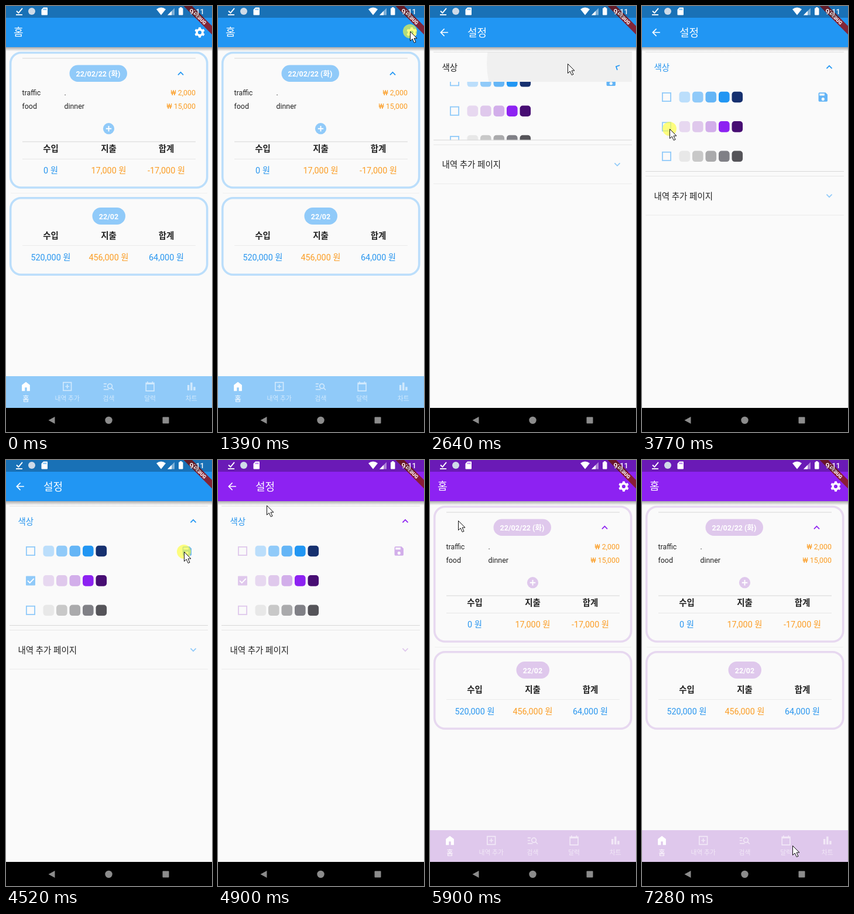
Animation, 352 px wide and 725 px high, one loop 7530 ms. Source, as an HTML page:

```html
<!DOCTYPE html>
<html lang="ko">
<head>
<meta charset="utf-8">
<title>가계부</title>
<style>
  html, body { margin: 0; width: 100%; height: 100%; overflow: hidden; background: #fafafa; }
  svg { display: block; width: 352px; height: 725px; }
  text { font-family: Roboto, "Noto Sans CJK KR", "Noto Sans CJK", sans-serif; }
</style>
</head>
<body>
<svg id="stage" viewBox="0 0 352 725"></svg>
<script>
const LOOP = 7530, STEP = 125.5;
const INK = '#222', BLUE_TEXT = '#2996ef', ORANGE = '#fb9d25';
const BLUE = ['#bbdefb', '#90caf9', '#64b5f6', '#2196f3', '#16306f'];
const PURPLE = ['#e7d8f0', '#dfc8ec', '#d2aeea', '#8d22f2', '#470d73'];
const GRAY = ['#e8e8e8', '#c8c8c8', '#aaaaac', '#808086', '#555459'];

const PATHS = {
  home: 'M4 21V9l8-6 8 6v12h-6v-7h-4v7z',
  chart: 'M4 9h4v11H4zM10 4h4v16h-4zM16 13h4v7h-4z',
  back: 'M20 11H7.8l5.6-5.6L12 4l-8 8 8 8 1.4-1.4L7.8 13H20z',
  chevron: 'M16.6 8.6 12 13.2 7.4 8.6 6 10l6 6 6-6z',
  save: 'M17 3H5a2 2 0 0 0-2 2v14a2 2 0 0 0 2 2h14a2 2 0 0 0 2-2V7zM12 19a3 3 0 1 1 0-6 3 3 0 0 1 0 6zM15 9H5V5h10z'
};
const OUTLINES = {
  add: 'M4 4h16v16H4zM12 8v8M8 12h8',
  search: 'M2 7h6M2 12h5M2 18h10M18.2 15.2 22 19M10 11.5a4.5 4.5 0 1 1 9 0a4.5 4.5 0 1 1-9 0',
  calendar: 'M4 5h16v16H4zM4 7h16M7 2v3M17 2v3'
};

// Cursor stops: [step, x, y]; positions between stops are interpolated.
const VISITS = [
  [[4, 346, 384], [5, 344, 266]],
  [[9, 338, 64], [10, 328, 43], [15, 328, 43], [16, 322, 52], [18, 250, 96], [19, 235, 98],
   [22, 235, 98], [23, 205, 125], [26, 60, 200], [27, 47, 209], [32, 47, 209], [33, 120, 198],
   [35, 300, 158], [36, 304, 156], [37, 304, 156], [38, 225, 128], [39, 83, 77], [40, 40, 52],
   [41, 22, 44], [44, 22, 44], [46, 36, 80], [47, 48, 103], [48, 60, 380], [49, 73, 686],
   [50, 73, 686], [51, 86, 684], [57, 243, 659], [58, 257, 656], [60, 257, 656]]
];
const CLICKS = [11, 19, 30, 31, 36, 37, 42, 43];
const PAGE_SHIFT = { 12: [130, .1], 13: [13, .5], 44: [13, .5], 45: [130, .1] };
const EXPANSION = { 20: .03, 21: .65 };
const SPLASH = { 19: [45, .04], 20: [92, .04], 21: [138, .04], 22: [340, .025] };

const rect = (x, y, w, h, fill, r = 0, extra = '') =>
  `<rect x="${x}" y="${y}" width="${w}" height="${h}" rx="${r}" fill="${fill}" ${extra}/>`;
const path = (d, fill, extra = '') => `<path d="${d}" fill="${fill}" ${extra}/>`;
const line = (x1, x2, y, color) => rect(x1, y - .5, x2 - x1, 1, color);
const text = (x, y, s, size, fill = INK, anchor = 'start', weight = 400) =>
  `<text x="${x}" y="${y + size * .36}" font-size="${size}" fill="${fill}" text-anchor="${anchor}" font-weight="${weight}">${s}</text>`;
const mid = (x, y, s, size, fill, weight) => text(x, y, s, size, fill, 'middle', weight);
const group = (transform, body, extra = '') => `<g transform="${transform}" ${extra}>${body}</g>`;

function icon(name, x, y, color, turn = 0) {
  const body = PATHS[name]
    ? path(PATHS[name], color, 'fill-rule="evenodd"')
    : path(OUTLINES[name], 'none', `stroke="${color}" stroke-width="2"`);
  return group(`translate(${x} ${y}) rotate(${turn}) scale(.857) translate(-12 -12)`, body);
}

function gear(x, y) {
  let body = '<circle r="4.9" fill="none" stroke="#fff" stroke-width="3.6"/>';
  for (let a = 0; a < 360; a += 60)
    body += path('M-2.4-5.5-1.8-8.8H1.8L2.4-5.5z', '#fff', `transform="rotate(${a})"`);
  return group(`translate(${x} ${y})`, body);
}

function mix(a, b, p) {
  const channel = (c, i) => parseInt(c.substr(1 + i * 2, 2), 16);
  return `rgb(${[0, 1, 2].map(i => Math.round(channel(a, i) * (1 - p) + channel(b, i) * p))})`;
}

const page = theme => rect(0, 0, 352, 684, '#fafafa') +
  rect(0, 70, 352, 7, 'url(#shadow)') + rect(0, 0, 352, 70, theme[3]);

function totals(y, gap, values, colors) {
  const xs = [76.5, 175.5, 274];
  return ['수입', '지출', '합계'].map((s, i) =>
    mid(xs[i], y, s, 14.5, INK, 700) + mid(xs[i], y + gap, values[i] + ' 원', 14.4, colors[i])).join('');
}

function homePage(theme) {
  const card = (y, h) => rect(7.7, y, 336, h, 'none', 18, `stroke="${theme[0]}" stroke-width="3.6"`);
  const faded = 'rgba(255,255,255,.58)';
  const tabs = [['home', '홈'], ['add', '내역 추가'], ['search', '검색'], ['calendar', '달력'], ['chart', '차트']];
  return page(theme) + text(13, 45, '홈', 18, '#fff') + gear(331, 45) +
    card(79.5, 229.5) + card(326.8, 130.5) +
    line(28, 324, 89, '#d8d8d8') + rect(108.5, 100.5, 98.5, 28.5, theme[1], 14.2) +
    mid(157.5, 115, '22/02/22 (화)', 12.5, '#fff', 700) + icon('chevron', 298.5, 115, theme[3], 180) +
    text(27.5, 148, 'traffic', 12.4) + text(99.5, 148, '.', 12.4) + text(324, 148, '₩ 2,000', 12.4, ORANGE, 'end') +
    text(27.5, 171, 'food', 12.4) + text(99.5, 171, 'dinner', 12.4) + text(324, 171, '₩ 15,000', 12.4, ORANGE, 'end') +
    `<circle cx="175.5" cy="208.7" r="9.6" fill="${theme[1]}"/>` +
    path('M175.5 204v9.4M170.8 208.7h9.4', 'none', 'stroke="#fff" stroke-width="1.9"') +
    line(28, 324, 231, '#d8d8d8') + line(28, 324, 260.5, '#e6e6e6') +
    totals(243, 36.5, ['0', '17,000', '-17,000'], [BLUE_TEXT, ORANGE, ORANGE]) +
    line(8, 344, 318.5, '#f0f0f0') +
    rect(147.5, 343, 56.5, 29, theme[1], 14.5) + mid(175.5, 358, '22/02', 12.5, '#fff', 700) +
    line(28, 324, 407.5, '#ebebeb') +
    totals(391, 36.5, ['520,000', '456,000', '64,000'], [BLUE_TEXT, ORANGE, BLUE_TEXT]) +
    rect(0, 630, 352, 54, theme[1]) +
    tabs.map(([name, label], i) => {
      const x = 34 + i * 70.7, color = i ? faded : '#fff';
      return icon(name, x, 647.5, color) + mid(x, 668.5, label, i ? 10.8 : 12.4, color);
    }).join('');
}

function settingsPage(theme, open, checked, splash) {
  const bottom = 129 + 152.5 * open, shift = bottom - 281.5;
  const rows = [BLUE, PURPLE, GRAY].map((colors, i) => {
    const y = 155 + i * 50.4;
    const box = checked && i === 1
      ? rect(34, y - 8, 16, 16, theme[1], 1) + path(`M37 ${y}l3.7 3.7 7-7.2`, 'none', 'stroke="#fff" stroke-width="1.9"')
      : rect(34.9, y - 7.1, 14.2, 14.2, 'none', 0, `stroke="${theme[1]}" stroke-width="1.8"`);
    return box + colors.map((c, j) => rect(63.5 + j * 22.5, y - 9.3, 18.6, 18.6, c, 5)).join('');
  }).join('');
  const header = splash
    ? `<circle cx="235" cy="98" r="${splash[0]}" fill="#000" fill-opacity="${splash[1]}" clip-path="url(#header)"/>` : '';
  return page(theme) + icon('back', 24, 45, '#fff') + text(64, 45.5, '설정', 18, '#fff') +
    line(6, 345, 78.5, '#e2e2e2') + header +
    text(20.5, 104.5, '색상', 14.5, open === 1 ? BLUE_TEXT : INK) +
    icon('chevron', 320, 104, open ? mix(BLUE[1], BLUE[3], open) === theme[3] ? theme[3] : open < 1 ? BLUE[3] : theme[3] : theme[1], 180 * open) +
    `<clipPath id="list"><rect x="0" y="129" width="352" height="${bottom - 129}"/></clipPath>` +
    group('', group(`translate(0 ${shift / 2})`, rows + icon('save', 309.3, 155, theme[2])), 'clip-path="url(#list)"') +
    line(6, 345, bottom, open ? '#d8d8d8' : '#ececec') + line(6, 345, bottom + 8, '#e6e6e6') +
    text(20.5, bottom + 42, '내역 추가 페이지', 14.5) + icon('chevron', 320, bottom + 41.5, theme[1]) +
    line(6, 345, bottom + 74.5, '#ebebeb');
}

function systemBars(theme) {
  const banner = group('translate(352 0) rotate(45)',
    rect(-34.3, 24, 68.6, 10.3, 'rgba(138,28,40,.92)') + mid(0, 29.2, 'DEBUG', 8.4, '#fff', 900));
  return banner + rect(0, 0, 352, 20, 'rgba(0,0,0,.25)') +
    path('M18 8.5l3.4 3.4 6.6-8', 'none', 'stroke="#fff" stroke-width="1.9"') + rect(17, 14, 11, 1.8, '#fff') +
    `<circle cx="44" cy="9" r="6" fill="#cfdbe8"/>` +
    path('M40 6.5a5 5 0 0 0 8 5.5a5 5 0 0 1-8-5.5z', mix(theme[3], '#000000', .25), 'opacity=".6"') +
    path('M64 2.5h6a1 1 0 0 1 1 1V14.5a1 1 0 0 1-1 1H61.500a1 1 0 0 1-1-1V6z', '#fff') +
    path('M64.5 4.500v2.500M66.500 4.500v2.500M68.500 4.500v2.500', 'none', `stroke="${theme[3]}" stroke-width="1"`) +
    path('M265 15.500 257 5.500Q265-.5 273 5.500z', '#fff') +
    path('M276 15.500 288 3.500V15.500z', '#fff', 'opacity=".45"') + path('M276 15.500 283 8.500V15.500z', '#fff') +
    rect(295, 3.500, 7.500, 12, '#fff', 1) + rect(297, 2, 3.500, 2, '#fff') +
    text(313.500, 9.500, '9:11', 12.800, '#fff', 'start', 500) +
    rect(0, 684, 352, 41, '#000') + path('M72.500 705 83.500 699v12z', '#8c8c8c') +
    '<circle cx="175.500" cy="705" r="6.200" fill="#8c8c8c"/>' + rect(267.500, 699.500, 11, 11, '#8c8c8c', 1);
}

function cursor(step) {
  for (const stops of VISITS) {
    const i = stops.findIndex((s, k) => step >= s[0] && step <= (stops[k + 1] || s)[0]);
    if (i < 0) continue;
    const a = stops[i], b = stops[i + 1] || a;
    const p = b[0] > a[0] ? (step - a[0]) / (b[0] - a[0]) : 0;
    const halo = CLICKS.includes(step) ? '<circle r="12" fill="#ffff3c" fill-opacity=".65"/>' : '';
    return group(`translate(${a[1] + (b[1] - a[1]) * p} ${a[2] + (b[2] - a[2]) * p})`,
      halo + path('M.5.5V16.500l3.700-3.500 3 6.500 2.800-1.200-3-6.300h5z', '#fff', 'stroke="#111"'));
  }
  return '';
}

const DEFS = `<defs>
  <linearGradient id="shadow" x2="0" y2="1"><stop stop-opacity=".32"/><stop offset="1" stop-opacity="0"/></linearGradient>
  <clipPath id="header"><rect x="6" y="79" width="339" height="50"/></clipPath></defs>`;
const stage = document.getElementById('stage');

function render(step) {
  const tint = step < 38 ? 0 : step === 38 ? .6 : 1;
  const theme = BLUE.map((c, i) => mix(c, PURPLE[i], tint));
  const move = PAGE_SHIFT[step] || [0, 1];
  const open = EXPANSION[step] || (step < 20 ? 0 : 1);
  const settings = step >= 12 && step <= 45;
  let body = DEFS;
  if (!settings || move[0]) body += homePage(theme);
  if (settings) body += group(`translate(0 ${move[0]})`,
    settingsPage(theme, open, step >= 31, SPLASH[step]), `opacity="${move[1]}"`);
  stage.innerHTML = body + systemBars(PURPLE.map((c, i) => tint ? c : BLUE[i])) + cursor(step);
}

let shown = -1;
const start = performance.now();
function tick() {
  const step = Math.floor((performance.now() - start) % LOOP / STEP);
  if (step !== shown) render(shown = step);
  requestAnimationFrame(tick);
}
tick();
</script>
</body>
</html>
```
